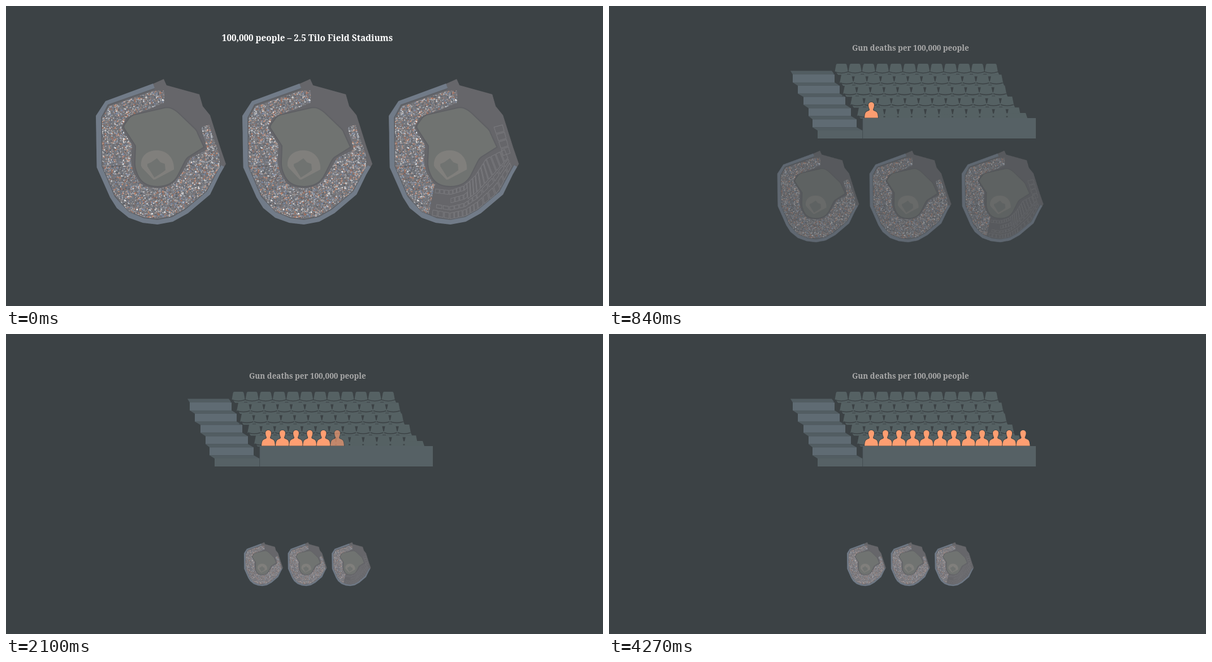
An HTML page with a canvas for the animation above (4340 ms loop, 1056x530 px).

```html
<!DOCTYPE html>
<html lang="en">
<head>
<meta charset="utf-8">
<title>Per 100,000 people</title>
<style>
  html, body { margin: 0; width: 100%; height: 100%; overflow: hidden; background: #3c4245; }
  canvas, svg { position: absolute; left: 0; top: 0; display: block; }
  text { font-family: "Noto Serif", serif; font-weight: 700; text-anchor: middle; }
</style>
</head>
<body>
<canvas id="stage" width="1056" height="530"></canvas>
<svg width="1056" height="530" viewBox="0 0 1056 530">
  <text id="intro" x="533" y="62" font-size="15.3" fill="#fff">100,000 people – 2.5 Tilo Field Stadiums</text>
  <g id="seating">
    <text x="533.3" y="79" font-size="13.5" fill="#a9a9a9">Gun deaths per 100,000 people</text>
    <g id="stairs"></g>
    <g id="seats"></g>
    <g id="people"></g>
    <path d="M449 198H755V234H449Z" fill="#566165"/>
    <path d="M448.7 198V234" stroke="#464f53" stroke-width=".8"/>
  </g>
</svg>
<script>
const LOOP = 4340, STEP = 70;
const BACK = '#3c4245', SEAT = '#556163', ORANGE = '#fe9e71';
const GRASS = '#707371', CLAY = '#807f7c';
const $ = id => document.getElementById(id);
const clamp = v => Math.max(0, Math.min(1, v));
const lerp = (a, b, t) => a + (b - a) * t;

/* ---------- stadium ---------- */
const OUTER_EDGE = 'L378 298L361 333L322 366L295 381L268 386L242 383L217 374L196 357L184 338L160.5 285Z';
const OUTLINE = 'M159 194L176 168L261 137L279 129L284 140L342 156L348 177L361 193L379 250L389 279' + OUTER_EDGE;
const RING = 'M159 194L176 168L260 137L263 145L180 174L168 197L169 283L192 337L217 364L244 375L268 378L294 373L317 360L355 328L374 293L380 281L386 284' + OUTER_EDGE;
const FIELD = 'M210 216Q208 213 211 209L219 198Q222 195 227 193L280 181Q288 179 295 183Q301 186 308 193L333 217Q337 221 338 225L349 249L322 266Q318 269 315 275L304 297Q294 318 268 318Q241 318 233 296Q228 285 229 273L230 247Z';
const CROWD = 'M262 150L279 149Q281 160 279 171L250 183L213 197L204 215L223 246L221 270L225 294L238 314Q250 322 268 322Q287 321 297 312L311 296L326 269L350 257L356 253L345 214L359 210L378 264L378 285L353 328L317 358L294 371L268 376L244 373L217 363L193 335L170 282L170 198L183 177Z';
const BOWL_IN = [[238, 322], [268, 325], [292, 317], [312, 297], [330, 268], [364, 252]];
const BOWL_OUT = [[231, 369], [268, 376], [294, 371], [317, 358], [353, 328], [376, 282]];
const BLOCK_ROWS = [
  { from: .02, to: .45, near: .02, far: .16, count: 8 },
  { from: .2, to: .45, near: .3, far: .45, count: 4 },
  { from: .45, to: 1, near: .04, far: .52, count: 11 },
  { from: .05, to: 1, near: .58, far: .7, count: 14 },
  { from: .02, to: 1, near: .8, far: 1, count: 17 }
];
const CROWD_COLORS = ['#979ca5', '#b0b2b7', '#6b727e', '#c9cacc', '#c08f79', '#a4705d', '#7c8aa5', '#5b5f66', '#989290', '#6a6668'];

function seeded(seed) {
  return () => {
    seed = seed + 0x6D2B79F5 | 0;
    let t = Math.imul(seed ^ seed >>> 15, 1 | seed);
    t = t + Math.imul(t ^ t >>> 7, 61 | t) ^ t;
    return ((t ^ t >>> 14) >>> 0) / 4294967296;
  };
}

function along(line, u) {
  const pos = u * (line.length - 1), i = Math.min(line.length - 2, Math.floor(pos));
  return [0, 1].map(k => lerp(line[i][k], line[i + 1][k], pos - i));
}

function bowlPoint(u, v) {
  const a = along(BOWL_IN, u), b = along(BOWL_OUT, u);
  return [lerp(a[0], b[0], v), lerp(a[1], b[1], v)];
}

function strokeQuad(c, points) {
  c.beginPath();
  points.forEach(p => c.lineTo(...p));
  c.closePath();
  c.stroke();
}

function drawEmptyBlocks(c) {
  c.strokeStyle = '#7b7b7f';
  c.lineWidth = 1;
  for (const { from, to, near, far, count } of BLOCK_ROWS) {
    for (let i = 0; i < count; i++) {
      const u0 = lerp(from, to, (i + .1) / count), u1 = lerp(from, to, (i + .9) / count);
      strokeQuad(c, [bowlPoint(u0, near), bowlPoint(u1, near), bowlPoint(u1, far), bowlPoint(u0, far)]);
    }
  }
  for (let i = 0; i < 4; i++) {
    const left = k => [345 + 17 * k, 214 + 52 * k], right = k => [360 + 14 * k, 210 + 52 * k];
    const k0 = i / 4, k1 = (i + .85) / 4;
    strokeQuad(c, [left(k0), right(k0), right(k1), left(k1)]);
  }
}

function drawCrowd(c, partial) {
  const random = seeded(41);
  c.save();
  if (partial) {
    c.clip(new Path2D('M150 120H285V240L239 319L228 375H150Z'));
  }
  c.clip(new Path2D(CROWD));
  c.fillStyle = '#75767b';
  c.fillRect(150, 120, 250, 270);
  for (let i = 0; i < 11000; i++) {
    const x = 167 + 213 * random(), y = 147 + 231 * random(), r = random();
    c.fillStyle = random() < .03 ? '#f2f2f2' : CROWD_COLORS[Math.floor(random() * CROWD_COLORS.length)];
    c.beginPath();
    c.arc(x, y, .7 + .8 * r * r, 0, 7);
    c.fill();
  }
  c.strokeStyle = 'rgba(83,87,94,.5)';
  c.lineWidth = 1;
  c.stroke(new Path2D('M168 245H224M168 210L206 213M170 285L224 280M185 318L228 297'));
  c.restore();
}

function makeStadium(partial) {
  const sprite = document.createElement('canvas');
  sprite.width = 480;
  sprite.height = 530;
  const c = sprite.getContext('2d');
  c.setTransform(2, 0, 0, 2, -310, -250);
  const fill = (d, color) => { c.fillStyle = color; c.fill(new Path2D(d)); };
  fill(OUTLINE, '#66666a');
  fill(RING, '#717b88');
  c.strokeStyle = '#5b5f65';
  c.lineWidth = 1.3;
  c.stroke(new Path2D('M263 146L181 175L169 197L170 283L193 336L218 363L244 374L268 377L294 372L317 359L354 328L373 293L380 281'));
  if (partial) drawEmptyBlocks(c);
  drawCrowd(c, partial);
  c.strokeStyle = '#5f6064';
  c.lineWidth = 4;
  c.stroke(new Path2D(FIELD));
  fill(FIELD, GRASS);
  fill('M239 283C237 264 251 255 267 255C284 255 298 268 297 289L263 307Z', CLAY);
  fill('M239 283L263 307L297 289L294 292L266 312Z', GRASS);
  fill('M250 283L250 279L257 276L267 269L273 276L281 279L282 290L263 304Z', GRASS);
  fill('M240 285L244 283L261 304L285 289L287 291L261 307Z', CLAY);
  return sprite;
}

const fullStadium = makeStadium(false);
const stadiums = [fullStadium, fullStadium, makeStadium(true)];
const stage = $('stage').getContext('2d');
stage.imageSmoothingQuality = 'high';

function drawStadiums(scale, opacity) {
  stage.setTransform(1, 0, 0, 1, 0, 0);
  stage.clearRect(0, 0, 1056, 530);
  stage.globalAlpha = opacity;
  stage.translate(533, 470.5);
  stage.scale(scale, scale);
  stage.translate(-533, -470.5);
  stadiums.forEach((sprite, i) => stage.drawImage(sprite, 155 + 259.1 * i, 125, 240, 265));
}

/* ---------- seating ---------- */
function addPath(parent, d, attrs) {
  const path = document.createElementNS('http://www.w3.org/2000/svg', 'path');
  path.setAttribute('d', d);
  for (const name in attrs) path.setAttribute(name, attrs[name]);
  $(parent).append(path);
  return path;
}

function buildStairs() {
  const left = [325, 334, 344, 353, 360, 369], right = [399, 408, 418, 428, 438, 448.5];
  left.forEach((l, i) => {
    const r = right[i], y = 121 + 19.8 * i;
    const [pl, pr, py] = i ? [left[i - 1], right[i - 1], y - 5.8] : [321, 394, 114.5];
    addPath('stairs', `M${pl} ${py}H${pr}L${r} ${y}H${l}Z`, { fill: '#525d62' });
    addPath('stairs', `M${l} ${y}H${r}V${y + 14}H${l}Z`, { fill: i < 5 ? '#5f6b73' : '#566165' });
  });
}

function buildSeats() {
  const pitch = 24.1, starts = [399, 408, 414, 427, 439];
  starts.forEach((x0, row) => {
    const y = 102 + 19.3 * row, end = x0 + 12 * pitch;
    if (row) {
      addPath('seats', `M${x0 + 3} ${y}H${end - 3}L${end} ${y + 15}H${x0}Z`, { fill: SEAT });
    }
    addPath('seats', `M${x0 + 3} ${y + 15}H${end}L${end + 2} ${y + 19.6}H${x0 + 6}Z`, { fill: SEAT });
    for (let i = 0; i < 12; i++) {
      const x = x0 + i * pitch;
      if (!row) {
        addPath('seats', `M${x + 5} ${y}H${x + 19}Q${x + 21} ${y} ${x + 21.5} ${y + 2}L${x + 23.6} ${y + 13}Q${x + 23.6} ${y + 15} ${x + 21} ${y + 15.4}Q${x + 12} ${y + 17} ${x + 3} ${y + 15.4}Q${x + .4} ${y + 15} ${x + .6} ${y + 13}L${x + 2.6} ${y + 2}Q${x + 3} ${y} ${x + 5} ${y}Z`, { fill: SEAT });
      } else if (i) {
        addPath('seats', `M${x - 2.6} ${y + 3}H${x + 2.6}L${x + .6} ${y + 12}H${x - .6}Z`, { fill: BACK });
      }
      if (row < 4) {
        addPath('seats', `M${x + .8} ${y + 14.4}Q${x + 12} ${y + 18.4} ${x + 23.4} ${y + 14.4}`, { fill: 'none', stroke: BACK, 'stroke-width': 1.5 });
        addPath('seats', `M${x - 2} ${y + 18.3}H${x + 4}`, { stroke: BACK, 'stroke-width': 1 });
      }
    }
  });
  addPath('seats', 'M449 194L727 189H737L740 198H449Z', { fill: SEAT });
  for (let x = 487; x < 725; x += pitch) {
    addPath('seats', `M${x - 1.5} 194.5h3v2h-3z`, { fill: BACK });
  }
  addPath('seats', 'M440 194Q446 197 452 196', { fill: 'none', stroke: BACK, 'stroke-width': 1.5 });
}

const PERSON = 'M-5 5C-5 -1.7 5 -1.7 5 5C5 8.5 3.6 11 3 12.5C3 15 5 15 8 16.5C11 18 11.5 22 12 27.6H-12C-11.5 22 -11 18 -8 16.5C-5 15 -3 15 -3 12.5C-3.6 11 -5 8.5 -5 5Z';
const people = [464, 489, 513, 537.3, 561.5, 586, 610, 636, 660, 684, 708, 732.5].map(x =>
  addPath('people', PERSON, {
    transform: `translate(${x} 170)`, fill: ORANGE, stroke: BACK, 'stroke-width': 2, 'paint-order': 'stroke'
  }));
buildStairs();
buildSeats();

/* ---------- timeline ---------- */
const SHRINK = { start: 700, length: 630 };
const ARRIVE = { first: 607, every: 268, fade: 235 };

function render(t) {
  const ease = 1 - (1 - clamp((t - SHRINK.start) / SHRINK.length)) ** 3;
  const dimmed = t > 700 ? lerp(.65, 1, clamp((t - 840) / 230)) : 1;
  drawStadiums(lerp(1, .3, ease), dimmed);
  $('intro').style.opacity = t > 700 ? 0 : 1;
  $('seating').style.opacity = clamp((t - 700) / 140);
  people.forEach((person, i) => {
    person.style.opacity = clamp((t - ARRIVE.first - ARRIVE.every * i) / ARRIVE.fade);
  });
}

const origin = performance.now();
let shown = -1;
function tick() {
  const t = Math.floor(((performance.now() - origin) % LOOP) / STEP) * STEP;
  if (t !== shown) render(shown = t);
  requestAnimationFrame(tick);
}
tick();
</script>
</body>
</html>
```
